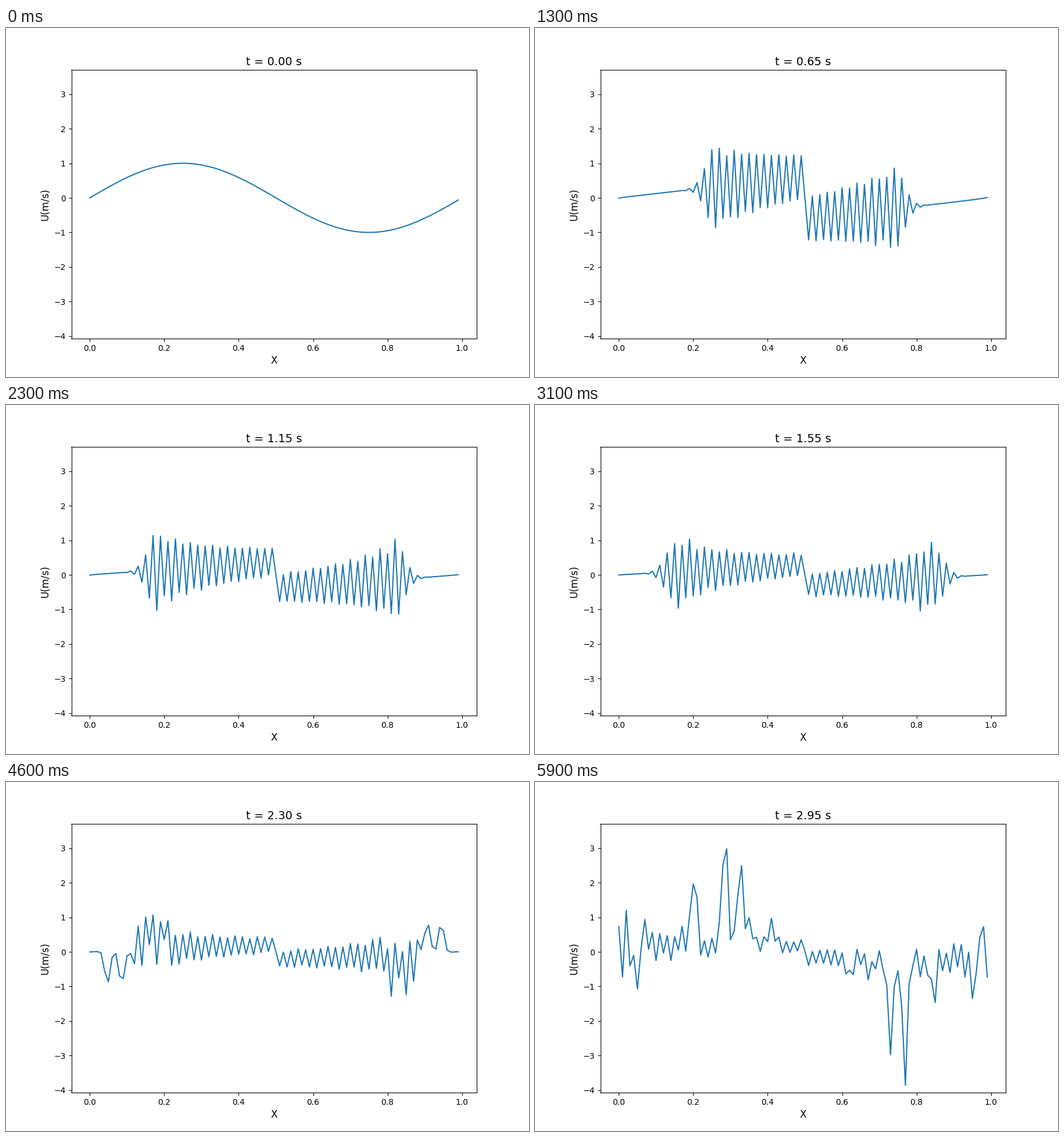
Animation of 900 by 600 pixels, one loop 6000 ms. Source, as a matplotlib script:

```python
import numpy as np
import matplotlib.pyplot as plt
from matplotlib.animation import FuncAnimation

DX = 0.01
DT = 0.0005
FRAME_DT = 0.05
FRAMES = 60


def wrap(u):
    """Periodic ghost cells at both ends."""
    u[0], u[-1] = u[-2], u[1]
    return u


def slope(u):
    """Inviscid Burgers equation with centred face fluxes."""
    face = 0.5 * (u[:-1] + u[1:])
    flux = 0.5 * face ** 2
    du = np.zeros_like(u)
    du[1:-1] = -(flux[1:] - flux[:-1]) / DX
    return du


def step(u):
    k1 = slope(u)
    k2 = slope(wrap(u + 0.5 * DT * k1))
    k3 = slope(wrap(u + 0.5 * DT * k2))
    k4 = slope(wrap(u + DT * k3))
    return wrap(u + DT / 6 * (k1 + 2 * k2 + 2 * k3 + k4))


def solve(u):
    states = [u]
    for _ in range(FRAMES - 1):
        for _ in range(round(FRAME_DT / DT)):
            u = step(u)
        states.append(u)
    return states


x = np.arange(100) * DX
waves = solve(np.sin(2 * np.pi * x))

fig, ax = plt.subplots(figsize=(9, 6), dpi=100)
line, = ax.plot(x, waves[0])
ax.set_xlim(-0.0495, 1.0395)
ax.set_ylim(-4.072, 3.702)
ax.set_xlabel("X", fontsize=12)
ax.set_ylabel("U(m/s)", fontsize=12)
title = ax.set_title("t = 0.00 s", fontsize=14)


def draw(i):
    line.set_ydata(waves[i])
    title.set_text(f"t = {i * FRAME_DT:.2f} s")
    return line, title


anim = FuncAnimation(fig, draw, frames=FRAMES, interval=100, repeat=True)
plt.show()
```
